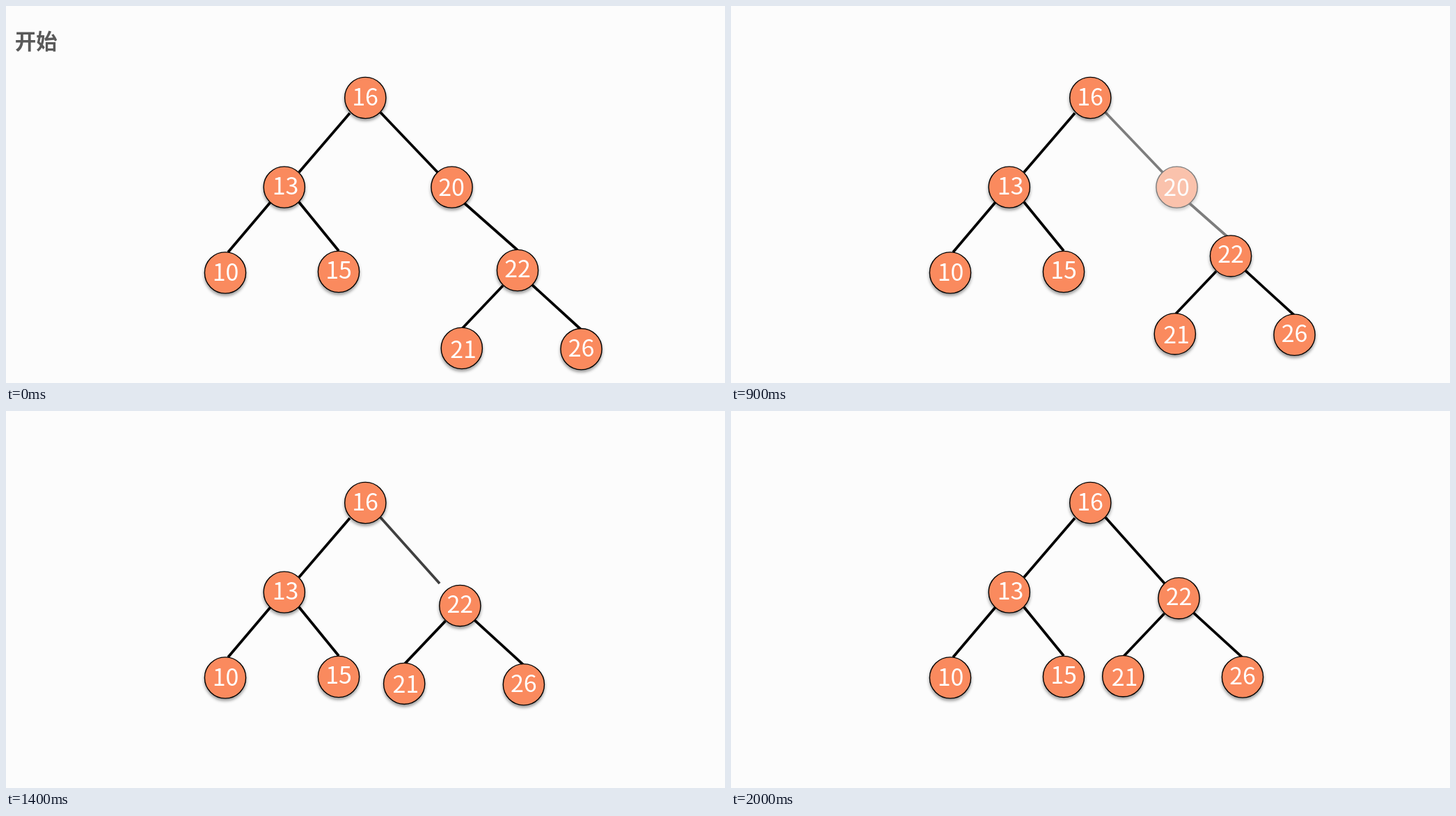
These frames come from a looping animation (1033x542 px, 2.2 s). An HTML page:

```html
<!DOCTYPE html>
<html lang="zh">
<head>
<meta charset="utf-8">
<title>Tree node removal</title>
<style>
  html, body { margin: 0; width: 100%; height: 100%; overflow: hidden; background: #fcfcfc; }
  svg { display: block; width: 100%; height: 100%; }
  text { font-family: "Noto Sans CJK SC", "Noto Sans CJK", "Noto Sans", sans-serif; }
  circle { fill: #fa8a5e; stroke: #000; stroke-width: 1.4; filter: drop-shadow(0 3px 2px rgba(0, 0, 0, .4)); }
  line { stroke: #000; stroke-width: 3.8; }
  .label { font-size: 34px; font-weight: 500; fill: #fff; text-anchor: middle; }
  #title { font-size: 30.5px; font-weight: 700; fill: #595959; }
</style>
</head>
<body>
<svg viewBox="0 0 1033 542">
  <text id="title" x="12.8" y="62.3">开始</text>
  <g id="fixed"></g>
  <g id="removed"></g>
  <g id="newLink"></g>
  <g id="subtree"></g>
</svg>
<script>
const LOOP = 2200, STEP = 100;
const byId = id => document.getElementById(id);
const [title, fixed, removed, newLink, subtree] =
  ["title", "fixed", "removed", "newLink", "subtree"].map(byId);

function add(parent, tag, attributes, text = "") {
  const element = document.createElementNS("http://www.w3.org/2000/svg", tag);
  for (const name in attributes) element.setAttribute(name, attributes[name]);
  element.textContent = text;
  parent.append(element);
}

const link = (parent, x1, y1, x2, y2) => add(parent, "line", { x1, y1, x2, y2 });

function node(parent, value, cx, cy, textX, baseline) {
  add(parent, "circle", { cx, cy, r: 29.6 });
  add(parent, "text", { class: "label", x: textX, y: baseline }, value);
}

link(fixed, 494, 154, 421, 239);
link(fixed, 380, 282, 319, 354);
link(fixed, 421, 282, 478, 352);
node(fixed, 16, 516.3, 132, 516, 143);
node(fixed, 13, 399.8, 260.5, 401.5, 271);
node(fixed, 10, 315, 383.5, 315.5, 394.5);
node(fixed, 15, 478, 382, 478, 392);

link(removed, 538, 153, 620, 239);
link(removed, 658, 283, 735, 351);
node(removed, 20, 640.5, 260.5, 640, 273);

link(newLink, 538, 153, 623, 248);

link(subtree, 714, 402, 656, 463);
link(subtree, 756, 401, 826, 465);
node(subtree, 22, 735, 380, 735, 390);
node(subtree, 21, 654.8, 492, 657, 505.5);
node(subtree, 26, 826.5, 493.3, 826.5, 504);

const progress = (time, start, end) => Math.min(1, Math.max(0, (time - start) / (end - start)));
const smooth = p => p * p * (3 - 2 * p);

// Cubic Bézier easing (0.262, 0, 0.398, 1), solved by bisection.
function glide(p) {
  let low = 0, high = 1, s;
  for (let i = 0; i < 24; i++) {
    s = (low + high) / 2;
    const x = 3 * s * (1 - s) * (0.262 * (1 - s) + 0.398 * s) + s ** 3;
    if (x < p) low = s; else high = s;
  }
  return smooth(s);
}

function draw(now) {
  const time = Math.floor(now % LOOP / STEP) * STEP;
  const move = glide(progress(time, 700, 1700));
  title.setAttribute("opacity", time < 700 ? 1 : 0);
  removed.setAttribute("opacity", 1 - smooth(progress(time, 700, 1100)));
  newLink.setAttribute("opacity", smooth(progress(time, 1100, 1550)));
  subtree.setAttribute("transform", `translate(${-91.5 * move} ${-110.8 * move})`);
}

let start;
function tick(now) {
  start ??= now;
  draw(now - start);
  requestAnimationFrame(tick);
}
requestAnimationFrame(tick);
</script>
</body>
</html>
```
